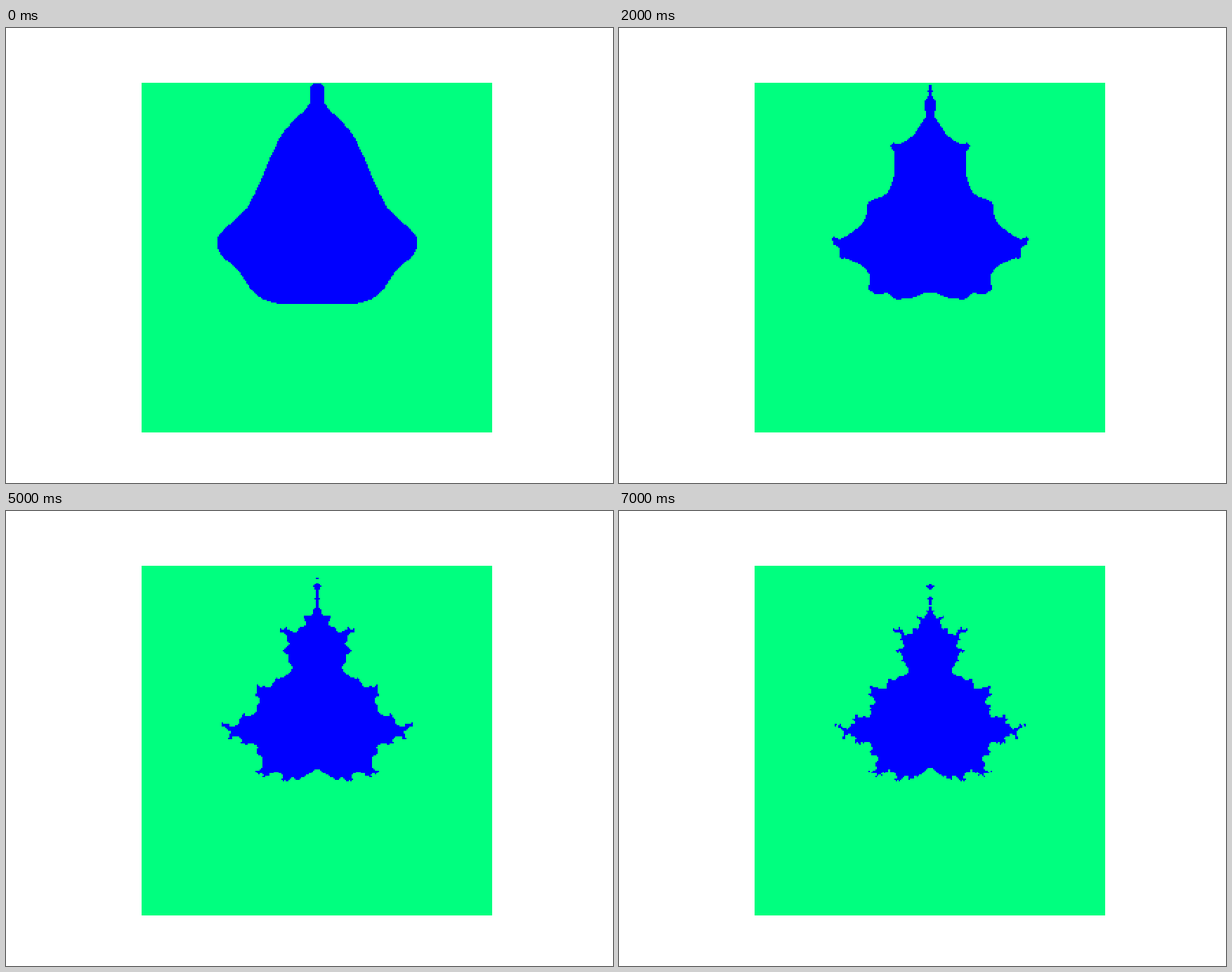
These frames come from a looping animation (864 by 648 pixels, 8000 ms). An HTML page with a canvas:

```html
<!DOCTYPE html>
<html>
<head>
<meta charset="utf-8">
<style>
  html, body { margin: 0; width: 100%; height: 100%; overflow: hidden; background: #fff; }
  canvas { display: block; }
</style>
</head>
<body>
<canvas id="stage" width="864" height="648"></canvas>
<script>
const ctx = document.getElementById('stage').getContext('2d');

// Visible square, and the grid of N x N samples spread over it
const LEFT = 193, TOP = 78, WIDTH = 499, HEIGHT = 498;
const N = 256, CELL = 499 / N, GRID_X = 193.5, GRID_Y = 77.2;
const FIRST_LIMIT = 4, STEPS = 8, STEP_MS = 1000;
const MAX_LIMIT = FIRST_LIMIT + STEPS - 1;

const cellAt = (pixel, origin) =>
  Math.min(N - 1, Math.max(0, Math.floor((pixel + 0.5 - origin) / CELL)));
const coord = cell => -2 + 4 * cell / (N - 1);

// Index of the first iterate of z² + c outside radius 2
function escapeStep(cr, ci) {
  let x = 0, y = 0;
  for (let n = 1; n <= MAX_LIMIT; n++) {
    [x, y] = [x * x - y * y + cr, 2 * x * y + ci];
    if (x * x + y * y > 4) return n;
  }
  return MAX_LIMIT + 1;
}

// The real axis runs downwards
const escapes = Array.from({ length: N * N }, (_, i) =>
  escapeStep(coord(Math.floor(i / N)), coord(i % N)));

const image = ctx.createImageData(WIDTH, HEIGHT);
const pixels = new Uint32Array(image.data.buffer);
const BLUE = 0xffff0000, GREEN = 0xff7fff00; // ABGR

function draw(limit) {
  for (let y = 0; y < HEIGHT; y++) {
    const row = cellAt(TOP + y, GRID_Y) * N;
    for (let x = 0; x < WIDTH; x++) {
      const escape = escapes[row + cellAt(LEFT + x, GRID_X)];
      pixels[y * WIDTH + x] = escape > limit ? BLUE : GREEN;
    }
  }
  ctx.putImageData(image, LEFT, TOP);
}

let shown = -1;
const start = performance.now();
function tick() {
  const step = Math.floor((performance.now() - start) / STEP_MS) % STEPS;
  if (step !== shown) draw(FIRST_LIMIT + (shown = step));
  requestAnimationFrame(tick);
}
tick();
</script>
</body>
</html>
```
